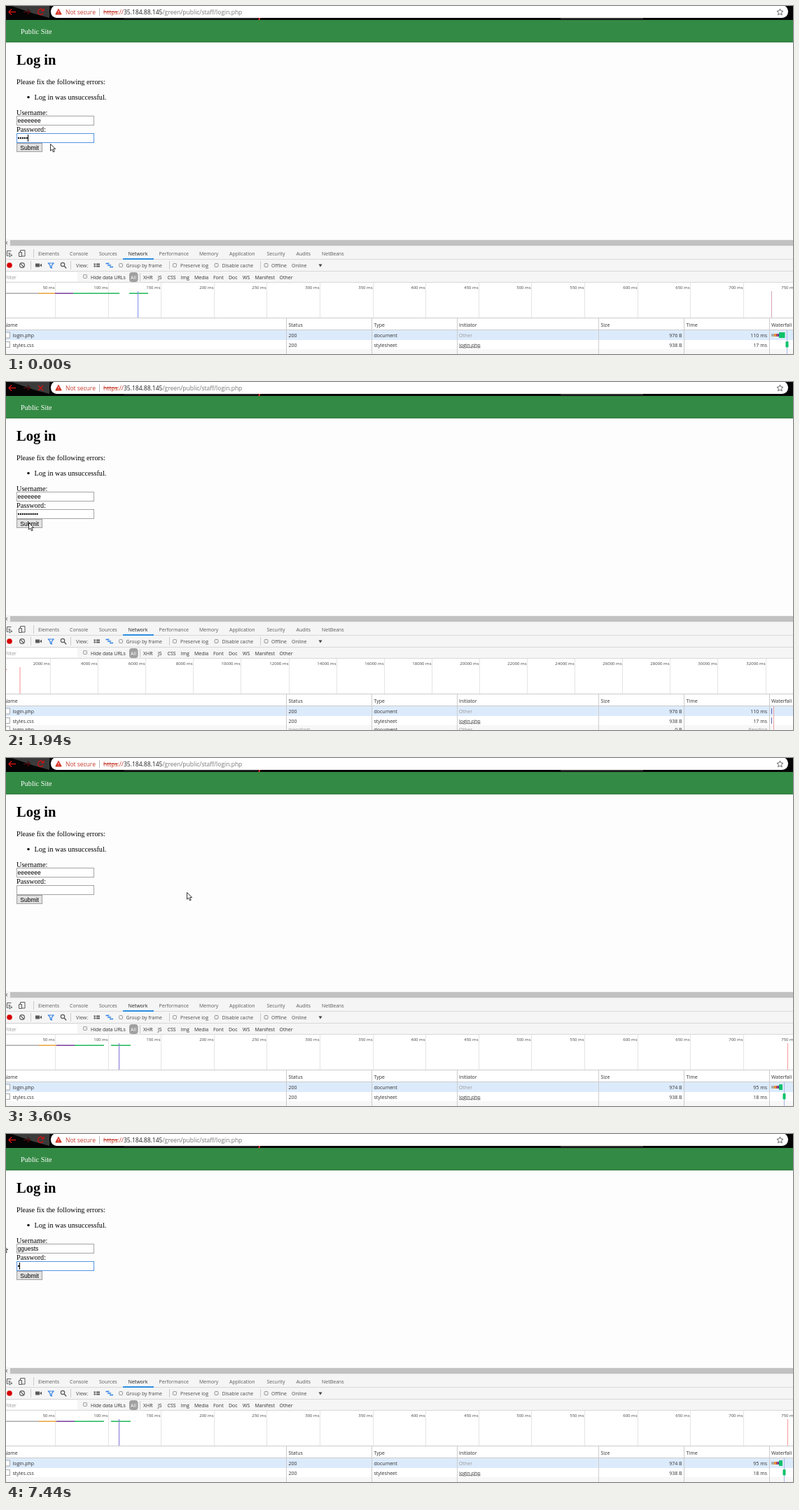
An HTML page that plays this animation: 1124 by 498 pixels, repeating every 8 s.

```html
<!DOCTYPE html>
<html lang="en">
<head>
<meta charset="utf-8">
<title>Log in</title>
<style>
  html, body { margin: 0; width: 100%; height: 100%; overflow: hidden; background: #fdfdfd; }
  svg { display: block; width: 1124px; height: 498px; white-space: pre; }
  .ui { font-family: "Open Sans", "Noto Sans", sans-serif; }
  .serif { font-family: "Liberation Serif", "Times New Roman", serif; }
  .field { font-family: "Liberation Sans", Arial, sans-serif; }
</style>
</head>
<body>
<svg id="stage" viewBox="0 0 1124 498"></svg>
<script>
const LOOP = 8000;
const OLD_USER = "eeeeeee", NEW_USER = "gguests";
const stage = document.getElementById("stage");
const pen = document.createElement("canvas").getContext("2d");

const rect = (x, y, w, h, fill, more = "") =>
  `<rect x="${x}" y="${y}" width="${w}" height="${h}" fill="${fill}" ${more}/>`;
const frame = (x, y, w, h, stroke, fill = "#fff", more = "") =>
  rect(x + .5, y + .5, w - 1, h - 1, fill, `stroke="${stroke}" ${more}`);
const path = (d, stroke, width = 1, fill = "none") =>
  `<path d="${d}" stroke="${stroke}" stroke-width="${width}" fill="${fill}"/>`;
const circle = (x, y, r, fill, more = "") =>
  `<circle cx="${x}" cy="${y}" r="${r}" fill="${fill}" ${more}/>`;
const text = (kind, size, x, y, str, fill, more = "") =>
  `<text class="${kind}" font-size="${size}" x="${x}" y="${y}" fill="${fill}" ${more}>${str}</text>`;
const ui = (x, y, str, fill = "#303030", more = "") => text("ui", 7, x, y, str, fill, more);
const serif = (x, y, str, fill = "#000") => text("serif", 10.24, x, y, str, fill);
const field = (x, y, str, fill = "#000") => text("field", 8.53, x, y, str, fill);
const END = 'text-anchor="end"';

function fieldWidth(str) {
  pen.font = '8.53px "Liberation Sans", Arial, sans-serif';
  return pen.measureText(str).width;
}

// Moments at which the picture changes
const spread = (from, to, n) => Array.from({ length: n }, (_, i) => from + (to - from) * i / (n - 1));
const moments = [0, ...spread(130, 1130, 8), ...spread(1250, 2220, 8), ...spread(2370, 3310, 8),
  ...spread(3450, 4420, 8), 4570, ...spread(5380, 5920, 5), 6200, 6760, 7300, 7440];

const mousePath = [[0, 63, 197], [701, 63, 197], [1130, 32, 201], [1943, 32, 201], [2370, 1025, 437],
  [2772, 1050, 440], [3310, 785, 374], [3450, 437, 206], [3588, 259, 192], [3727, 126, 178],
  [3865, 75, 166], [4004, 55, 164], [4420, -4, 158], [4570, -5, 158], [LOOP, -5, 158]];

function mouseAt(t) {
  const i = mousePath.findIndex(p => p[0] > t);
  const [t0, x0, y0] = mousePath[i - 1], [t1, x1, y1] = mousePath[i];
  const k = (t - t0) / (t1 - t0);
  return [Math.round(x0 + (x1 - x0) * k), Math.round(y0 + (y1 - y0) * k)];
}

function browserBar(loading) {
  const icon = loading
    ? path("M46 5l7 7M53 5l-7 7", "#d01010", 1.4)
    : path("M52.6 5.6A4 4 0 1 0 53.2 10M53.8 3.5v3.3h-3.3", "#d01010", 1.4);
  return rect(0, 0, 1124, 20, "#050505") +
    path("M8 0H62V17L40 11Z", "none", 0, "#3b3b3b") +
    rect(792, 16, 118, 3, "#333") + rect(168, 17, 192, 2, "#222") + path("M363 16l-2 4", "#d33", 2) +
    path("M14 8.5H4M8 4.5l-4 4 4 4", "#d01010", 1.4) +
    path("M25 8.5h9M31 5l3 3.5-3 3.5", "#4d0909", 1.4) + icon +
    rect(64, -1, 1053, 18, "#fff", 'rx="8.5"') +
    path("M75 4.2l4.2 7.8h-8.4z", "#d93025", 1, "#d93025") + path("M75 6.6v2.7M75 10.3v1", "#fff", .9) +
    text("ui", 8.5, 85, 11.5, "Not secure", "#c5392b") +
    rect(133, 3, 1, 11, "#bbb") +
    text("ui", 8.5, 139, 11.5, '<tspan fill="#c5392b"><tspan text-decoration="line-through">https</tspan>://</tspan>' +
      '<tspan fill="#222">35.184.88.145</tspan>/green/public/staff/login.php', "#777") +
    path("M1105.5 4l1.3 3 3.2.3-2.4 2.2.7 3.2-2.8-1.7-2.8 1.7.7-3.2-2.4-2.2 3.2-.3z", "#555", .9);
}

function page(s) {
  const blue = "#5794e6", gray = "#a5a5a5";
  const nameWidth = fieldWidth(s.user);
  let out = rect(0, 20, 1124, 32, "#338a44") + rect(0, 51, 1124, 1, "#2b7a3a") + rect(0, 52, 1124, 1, "#e4ebe5") +
    serif(21, 40, "Public Site", "#fff") +
    text("serif", 20.5, 15, 84, "Log in", "#000", 'font-weight="bold"') +
    serif(15, 112, "Please fix the following errors:") +
    circle(32, 130.5, 1.7, "#000") + serif(40.5, 134, "Log in was unsuccessful.") +
    serif(15, 155.5, "Username:") + frame(15, 157, 111, 14, s.focus == "user" ? blue : gray) +
    field(16.5, 167, s.user) +
    serif(15, 180, "Password:") + frame(15, 182, 111, 14, s.focus == "pass" ? blue : gray);
  for (let i = 0; i < s.dots; i++) out += circle(18 + i * 2.95, 189, 1.15, "#000");
  out += frame(15, 196, 37, 13, s.pressed ? "#777" : "#a0a0a0", s.pressed ? "#d2d2d2" : "#e1e1e1") +
    field(20.3, 205.5, "Submit");
  if (s.selectFrom !== null) {
    const end = 16.5 + nameWidth, from = Math.min(end, Math.max(16.5, s.selectFrom));
    out += `<clipPath id="sel">${rect(from, 159, end - from, 11, "#000")}</clipPath>` +
      `<g clip-path="url(#sel)">${rect(16, 159, 36, 10, "#3390ff")}${field(16.5, 167, s.user, "#fff")}</g>` +
      path(`M16.5 169H${end}`, "#b04468", 1);
  }
  if (s.popup) {
    out += rect(14, 172, 113, 35, "#000", 'opacity=".08" rx="1"') + rect(14.5, 172, 112, 34.3, "#bbb", 'rx="1"') +
      rect(15, 171.5, 111, 34, "#fff") + text("ui", 7.7, 23, 191.5, s.popup, "#333");
  }
  if (s.caret && s.focus == "user") out += rect(Math.round(16.5 + nameWidth), 159, 1, 10, "#000");
  if (s.caret && s.focus == "pass") out += rect(Math.round(16.4 + s.dots * 2.95), 184, 1, 10, "#000");
  return out;
}

function toolbars() {
  const icon = "#5a5a5a";
  const check = x => frame(x - 3, 368, 6, 6, "#9a9a9a", "#eee", 'rx="1"');
  const bars = [[39, 348], [35, 365], [92, 365], [233, 365], [363, 365], [191, 382]];
  const tabs = [["Elements", 46], ["Console", 91], ["Sources", 133], ["Network", 174.5], ["Performance", 218.5],
    ["Memory", 276], ["Application", 319], ["Security", 372.5], ["Audits", 414.5], ["NetBeans", 451]];
  const options = [["View:", 100], ["Group by frame", 171.5], ["Preserve log", 249], ["Disable cache", 308.5],
    ["Offline", 379], ["Online", 408]];
  const types = [["XHR", 196], ["JS", 217], ["CSS", 230.5], ["Img", 249.5], ["Media", 269], ["Font", 296],
    ["Doc", 318], ["WS", 338], ["Manifest", 355.5], ["Other", 390.5]];
  return rect(0, 334, 1124, 11, "#f1f1f1") + rect(6, 335, 1118, 8, "#c1c1c1") + path("M2 337l-2 2 2 2", "#666") +
    rect(0, 345, 1124, 51, "#f5f5f5") +
    [362, 379, 395].map(y => rect(0, y, 1124, 1, "#d8d8d8")).join("") +
    bars.map(([x, y]) => rect(x, y, 1, 12, "#ccc")).join("") +
    tabs.map(([s, x]) => ui(x, 357, s, s == "Network" ? "#222" : "#5a5a5a")).join("") +
    rect(167, 361, 44, 2, "#2b8fe0") +
    path("M7.5 350.5h-6v7h2M4 353l5 4-2.4.2-1.3 2z", icon) +
    path("M20.5 352v-2.5h6.5v8.5h-4M18.5 352.5h4v6h-4z", icon) +
    circle(5, 371, 3.8, "#d80000") + circle(23, 371, 3.4, "none", `stroke="${icon}" stroke-width="1.2"`) +
    path("M20.6 368.6l4.8 4.8", icon, 1.2) + rect(42, 368.5, 6, 5, icon) + path("M48 371l3-2.5v5z", "none", 0, icon) +
    path("M60.5 368h7.5l-2.8 3.5v3.5l-2-1.2v-2.3z", "#2b7de0", 1.2) +
    circle(81, 370, 2.7, "none", `stroke="${icon}" stroke-width="1.2"`) + path("M83 372l3.2 3.2", icon, 1.4) +
    path("M125.5 369.5h2.5M129 369.5h5M125.5 372.5h2.5M129 372.5h5", icon, 2) +
    path("M142.5 368.5h5M145 371h5M148 373.5h5", "#2b7de0", 1.4) +
    [164, 241, 300.5, 371.5].map(check).join("") +
    options.map(([s, x]) => ui(x, 374, s, "#4a4a4a")).join("") + path("M446.5 369.5h5l-2.5 4z", "none", 0, "#444") +
    rect(0, 381, 102, 13, "#fff") + ui(-1.5, 391, "Filter", "#999") +
    frame(110, 384, 6, 6, "#9a9a9a", "#eee", 'rx="1"') + ui(121, 390.5, "Hide data URLs") +
    rect(176, 381, 12.5, 14, "#a0a0a0", 'rx="4"') + ui(178, 390.5, "All", "#fff") +
    types.map(([s, x]) => ui(x, 390.5, s)).join("");
}

function overview(s) {
  const [first, gap, unit] = s.pending ? [63, 68.1, 2000] : [70, 75.6, 50];
  let out = rect(0, 396, 1124, 51, "#fff");
  for (let i = 0; i < 16; i++) {
    const x = Math.round(first + i * gap);
    out += rect(x, 396, 1, 51, "#e4e4e4") + text("ui", 6, x - .5, 404.5, (i + 1) * unit + " ms", "#444", END);
  }
  if (s.pending) return out + rect(0, 411, 1, 1, "#e05050") + rect(19.5, 408, 1, 39, "#f98d8d");
  const [a, b, c, d, e, f, start, load] = s.fresh
    ? [47, 72, 98, 140, 150, 178, 161, 1116] : [46, 70, 96, 162, 176, 203, 188, 1093];
  const span = (x, to, fill) => rect(x, 410.5, to - x, 1.5, fill);
  return out + span(0, a, "#a9a9a9") + span(a, b, "#e9a13b") + span(b, c, "#7b3a9a") + span(c, d, "#1db954") +
    span(e, f, "#1db954") + rect(start, 408, 1, 39, s.fresh ? "#8174d8" : "#7e8df0") +
    rect(load, 408, 1, 39, s.fresh ? "#f79a9a" : "#d9a0ae");
}

function table(s) {
  const row = (y, cells, ink = "#303030") => {
    const [name, status, type, from, size, time] = cells;
    const link = from == "Other" ? "" : 'text-decoration="underline"';
    return frame(-1, y - 7.5, 7, 9, "#aaa") + ui(9.5, y, name, "#303030") + ui(403.5, y, status, ink) +
      ui(525.5, y, type) + ui(647, y, from, link ? "#303030" : "#999", link) +
      ui(965.5, y, size, "#303030", END) + ui(1087, y, time, ink, END);
  };
  const heads = [["Name", -3], ["Status", 403.5], ["Type", 525.5], ["Initiator", 647], ["Size", 849.5],
    ["Time", 971.5], ["Waterfall", 1093]];
  let out = rect(0, 446, 1124, 52, "#fff") + rect(0, 446, 1124, 1, "#ccc") + rect(0, 463, 1124, 1, "#ccc") +
    rect(0, 464, 1124, 14, "#dcebfc") + rect(0, 491, 1124, 7, "#f7f7f7") +
    heads.map(([h, x]) => ui(x, 458.5, h)).join("") +
    row(474, ["login.php", "200", "document", "Other", s.fresh ? "974 B" : "976 B", s.fresh ? "95 ms" : "110 ms"]) +
    row(487.5, ["styles.css", "200", "stylesheet", "login.php", "938 B", s.fresh ? "18 ms" : "17 ms"]);
  if (s.pending) out += row(500, ["login.php", "(pending)", "document", "Other", "0 B", "Pending"], "#999");
  out += [400, 522, 644, 846, 968, 1090].map(x => rect(x, 447, 1, 51, "#ccc")).join("");
  if (s.pending) {
    return out + rect(1093, 467, 1, 8, "#5a62b8") + rect(1093, 480, 1, 9, "#5a62b8") + rect(1096, 464, 1, 34, "#f0a0a8");
  }
  const mark = s.fresh ? 1111 : 1115;
  return out + rect(mark, 464, 1, 34, "#a9b8f0") + rect(1093, 469, 4, 4, "#aaa") + rect(1097, 469, 3, 4, "#e9953b") +
    rect(1100, 469, 1.5, 4, "#c0392b") + rect(1101.5, 469, 2.5, 4, "#7b3a9a") +
    rect(1104, 467, s.fresh ? 5 : 8.5, 8, "#0cc26a") + rect(mark - 1.5, 480, 4, 8.5, "#0cc26a", 'rx="1"');
}

function pointer(x, y, beam) {
  return beam
    ? path(`M${x - 2} ${y - 4.5}h4M${x} ${y - 4.5}v9M${x - 2} ${y + 4.5}h4`, "#222", 1)
    : `<g transform="translate(${x} ${y})">` +
      path("M.5.5v9.7l2.3-2 1.7 3.8 1.7-.8-1.7-3.6h3.2z", "#222", .9, "#fff") + "</g>";
}

function draw(t) {
  const [x, y] = mouseAt(t);
  const between = (a, b) => t >= a && t < b;
  const typed = NEW_USER.slice(0, Math.round(1 + (t - 5380) / 90));
  const state = {
    user: t < 5380 ? OLD_USER : typed,
    popup: between(4000, 6200) && (t < 5380 ? OLD_USER : NEW_USER),
    selectFrom: between(4100, 5380) ? x : null,
    dots: t < 2370 ? Math.min(10, t < 130 ? 5 : 6 + Math.floor((t - 129) / 142.8)) : t >= 7440 ? 1 : 0,
    focus: t < 1250 || t >= 6200 ? "pass" : t >= 4000 ? "user" : "",
    caret: !between(4100, 5380) && !between(6760, 7300),
    pressed: between(1250, 1380),
    pending: between(1380, 2220),
    fresh: t >= 2220
  };
  const inOverview = y > 396 && y < 447;
  const inField = x > 15 && x < 126 && y > 157 && y < 171;
  const hoverX = t < 2400 ? x - 41 : x;
  stage.innerHTML = rect(0, 0, 1124, 498, "#fdfdfd") + browserBar(between(1380, 2370)) + page(state) +
    toolbars() + overview(state) + table(state) +
    (inOverview ? rect(hoverX - .5, 396, 1.7, 51, "#3f78e6") : "") + pointer(x, y, inOverview || inField);
}

let shown = -1;
function tick(now) {
  const t = now % LOOP;
  const moment = moments.findLast(m => m <= t);
  if (moment !== shown) draw(shown = moment);
  requestAnimationFrame(tick);
}
tick(0);
</script>
</body>
</html>
```
